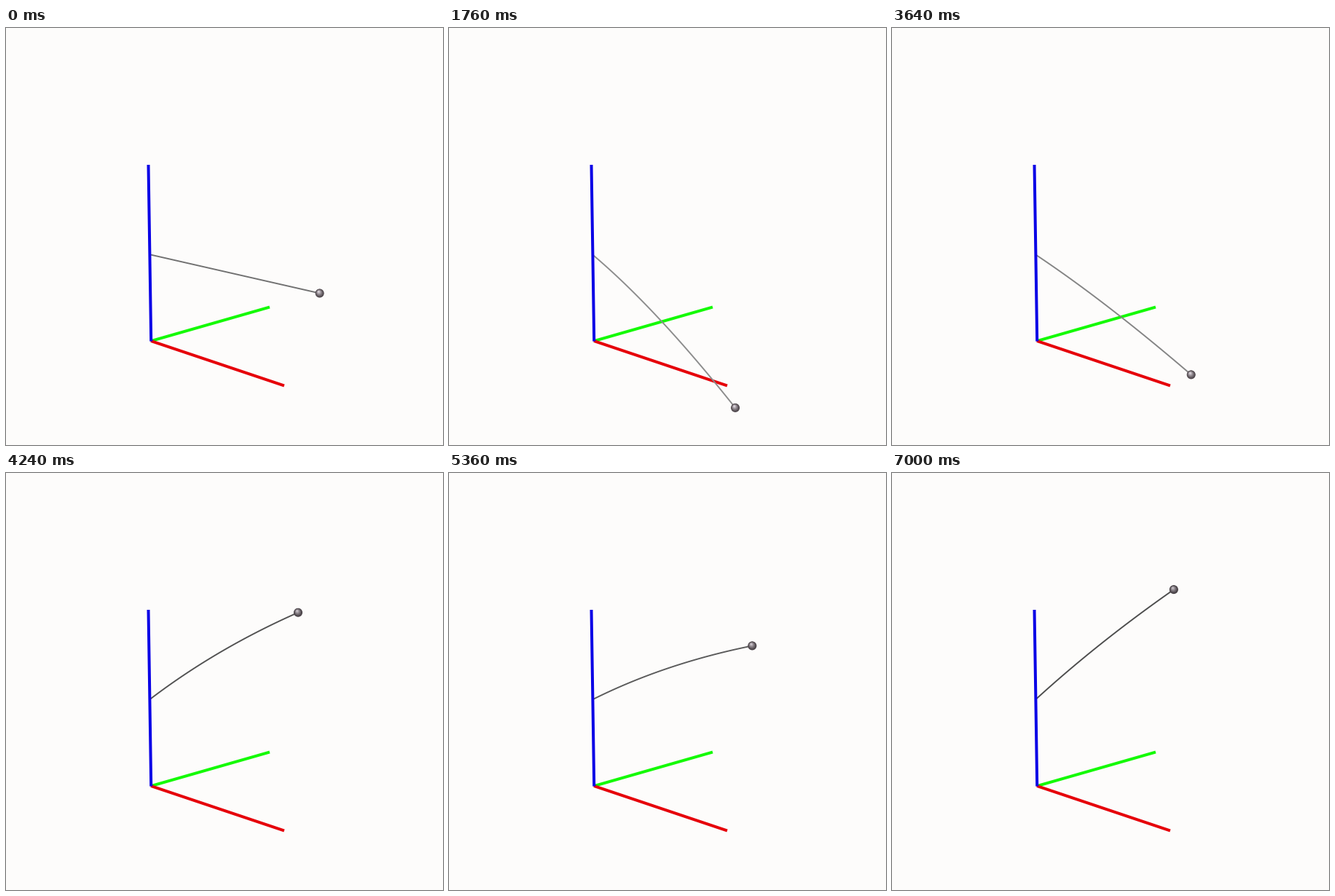
A matplotlib script that plays this animation: 600x573 px, repeating every 7.06 s.

```python
import numpy as np
import matplotlib.pyplot as plt
from matplotlib.animation import FuncAnimation
from matplotlib.patches import Circle

W, H, DPI = 600, 573, 100
LOOP, STEP = 7060, 20
PX = 72 / DPI

# Hanging phase: a damped step response around the loaded position
REST_Y, RELEASE, PERIOD, LOAD, DECAY = 364, 1163, 1055, 80, 0.87

# Raised phase: turning points (ms, tip height) joined by cosine easing
TURNS = [(3800, 494), (4552, 15), (5140, 303), (5770, 60),
         (6420, 312), (7200, 132)]
LIFT = TURNS[0][0]

# The tip travels on a circular arc
ARC_X, ARC_Y, ARC_R = 10.5, 347, 420


def tip_y(t):
    if t <= RELEASE:
        return REST_Y
    if t < LIFT:
        cycles = (t - RELEASE) / PERIOD
        u = LOAD * (1 - DECAY ** (2 * cycles) * np.cos(2 * np.pi * cycles))
        return REST_Y + u + 0.00073 * u * u
    for (t0, y0), (t1, y1) in zip(TURNS, TURNS[1:]):
        if t <= t1:
            return y0 + (y1 - y0) * (1 - np.cos(np.pi * (t - t0) / (t1 - t0))) / 2


def tip_x(y):
    return ARC_X + np.sqrt(ARC_R ** 2 - (y - ARC_Y) ** 2)


def sag(t, y):
    """Bow of the rod: static when hanging, lagging when swung upwards."""
    bend = 0.0004 * max(y - REST_Y, 0) ** 2
    if t > LIFT:
        rise = max(tip_y(t - 5) - tip_y(t + 5), 0) / 10
        bend += min(19 * rise, 8) * np.clip((380 - y) / 100, 0, 1)
    return bend


def rod_curve(t, x, y):
    root = np.array([198, 311 + 0.007 * (y - REST_Y)])
    tip = np.array([x, y])
    control = root + 0.45 * (tip - root) - [0, 2 * sag(t, y)]
    s = np.linspace(0, 1, 50)[:, None]
    return (1 - s) ** 2 * root + 2 * s * (1 - s) * control + s ** 2 * tip


fig = plt.figure(figsize=(W / DPI, H / DPI), dpi=DPI, facecolor="#fdfcfb")
ax = fig.add_axes([0, 0, 1, 1])
ax.set_xlim(-0.5, W - 0.5)  # whole numbers fall on pixel centres
ax.set_ylim(H - 0.5, -0.5)
ax.axis("off")


def axis_line(start, end, color, order):
    ax.plot(*zip(start, end), color=color, lw=4 * PX, zorder=order,
            solid_capstyle="butt")


axis_line((199, 429.5), (361.5, 383), "#14fa05", 1)
axis_line((198.5, 429.5), (381.5, 491), "#e6000a", 2)
axis_line((195, 187.5), (198.7, 430), "#0a00e6", 4)

rod, = ax.plot([], [], lw=1.9 * PX, zorder=3)

# Shaded sphere: shrinking discs drift towards the highlight
DARK, LIGHT = np.array([0.30, 0.27, 0.29]), np.array([0.88, 0.85, 0.88])
levels = np.linspace(0, 1, 12)
discs = [ax.add_patch(Circle((0, 0), 6 - 5.2 * f, lw=0, zorder=5 + f))
         for f in levels]


def update(i):
    t = i * STEP
    y = tip_y(t)
    x = tip_x(y)
    rod.set_data(*rod_curve(t, x, y).T)
    rod.set_color(str(0.44 + 0.0007 * (y - REST_Y)))
    tone = min(1, 1 + 0.0005 * (y - REST_Y))
    for f, disc in zip(levels, discs):
        disc.center = (x - 1.4 * f, y - 2.2 * f)
        disc.set_facecolor(tone * (DARK + (LIGHT - DARK) * f ** 1.3))
    return [rod, *discs]


anim = FuncAnimation(fig, update, frames=LOOP // STEP, interval=STEP,
                     repeat=True, repeat_delay=0, blit=False)
plt.show()
```
